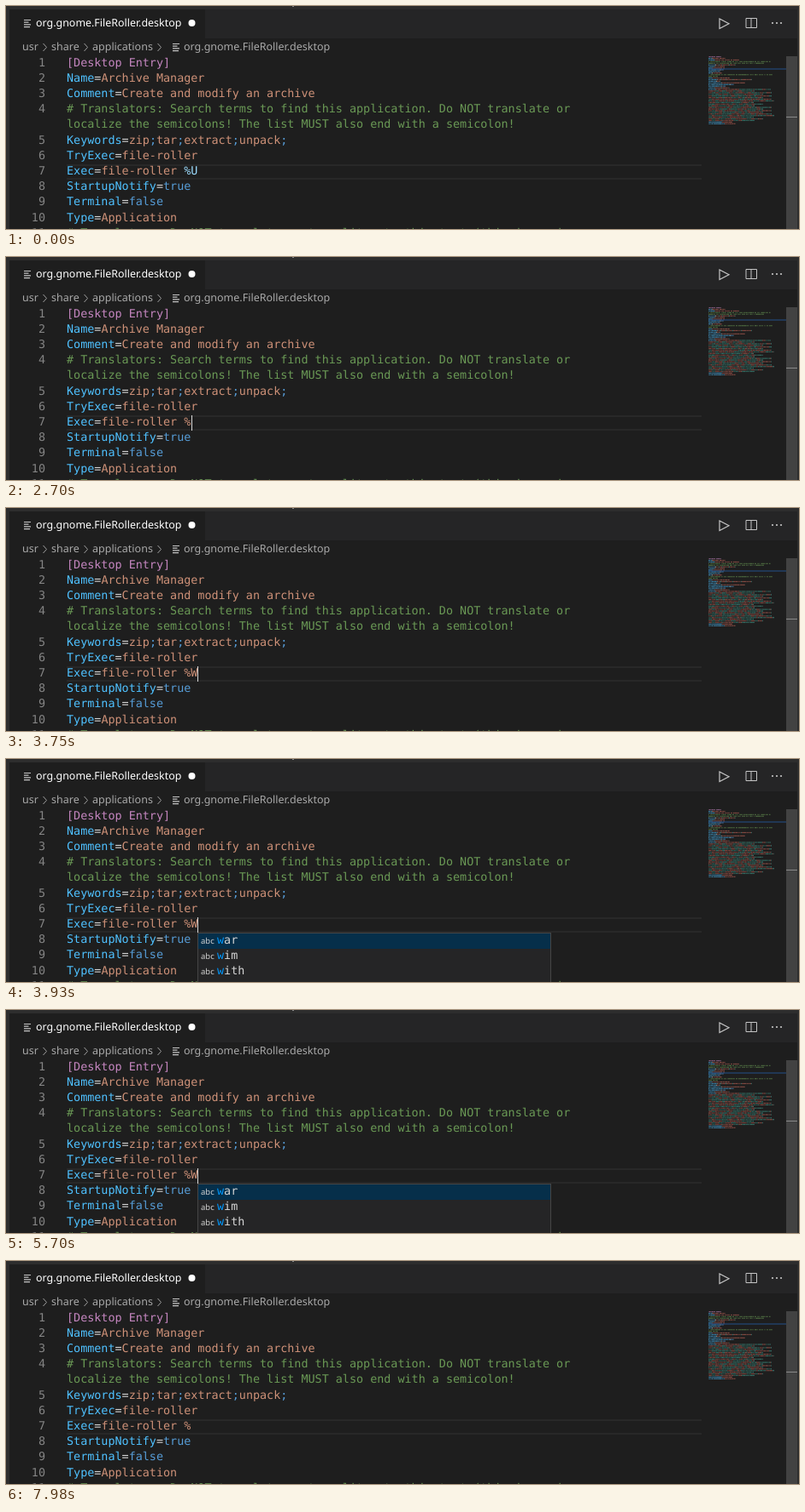
Recreate the animation shown at these times as an HTML page with a canvas. Size 928 by 262 pixels, loop 8000 ms.

```html
<!DOCTYPE html>
<html lang="en">
<head>
<meta charset="utf-8">
<title>Editing a desktop entry</title>
<style>
  html, body { margin: 0; width: 928px; height: 262px; overflow: hidden; background: #1e1e1e; }
  #stage { position: relative; width: 928px; height: 262px; overflow: hidden; text-rendering: geometricPrecision; }
  #stage > * { position: absolute; }
  .box { background: var(--c); }
  .tab, .crumb { font: 12.45px/18px "Noto Sans", sans-serif; white-space: pre; }
  .tab { top: 11px; color: #fff; }
  .crumb { top: 39px; font-size: 12.5px; color: #a9a9a9; }
  .row, .num, .item { font: 13.41px/18.2px "DejaVu Sans Mono", monospace; height: 18.2px; white-space: pre; }
  .row { left: 71px; color: #d4d4d4; }
  .num { left: 0; width: 46px; text-align: right; color: #858585; }
  .section { color: #c586c0; }
  .key { color: #4fc1ff; }
  .value { color: #ce9178; }
  .note { color: #6a9955; }
  .word, .semi { color: #569cd6; }

  #line { left: 71px; top: 186px; width: 743px; height: 18px; box-sizing: border-box; border: solid #282828; border-width: 2px 0; }
  #caret { top: 186px; left: 224px; width: 1px; height: 18px; background: #d8d8d8; }
  #popup { left: 224px; top: 204px; width: 412px; height: 70px; background: #252526; border: 1px solid #454545; }
  .item { position: relative; padding-left: 22px; color: #d4d4d4; }
  .item.on { background: #062f4a; }
  .item b { font-weight: normal; color: #0097fb; }
  .item i { position: absolute; left: 3px; font: 9.5px/18px "Noto Sans", sans-serif; color: #d0d0d0; }

  #caret, #popup, #pct, #u, #w { animation: 8s step-end infinite; }
  #caret { animation-name: blink, move; }
  #popup { animation-name: popup; }
  #pct { animation-name: recolor; }
  #u { color: #9cdcfe; animation-name: erase; }
  #w { position: absolute; animation-name: type; }

  @keyframes blink {
    0%, 11.25%, 22.5%, 38.625%, 52.125%, 63%, 77.25%, 88.5%, 99.75%, 100% { opacity: 0; }
    5.625%, 16.875%, 28.125%, 43.875%, 57%, 69%, 83.25%, 94.125% { opacity: 1; }
  }
  @keyframes move { 0% { left: 224px; } 33% { left: 217px; } 46.125% { left: 224px; } 71.625%, 100% { left: 217px; } }
  @keyframes popup { 0% { visibility: hidden; } 48.375% { visibility: visible; } 71.625%, 100% { visibility: hidden; } }
  @keyframes recolor { 0% { color: #9cdcfe; } 33%, 100% { color: #ce9178; } }
  @keyframes erase { 0% { visibility: visible; } 33%, 100% { visibility: hidden; } }
  @keyframes type { 0% { visibility: hidden; } 46.125% { visibility: visible; } 71.625%, 100% { visibility: hidden; } }
</style>
</head>
<body>
<div id="stage">
  <div class="box" style="--c:#252526;left:4px;top:4px;width:922px;height:34px"></div>
  <div class="box" style="--c:#1e1e1e;left:4px;top:4px;width:229px;height:34px"></div>
  <div class="box" style="--c:#2d2d2d;left:0;top:0;width:928px;height:4px"></div>
  <div class="box" style="--c:#2d2d2d;left:0;top:0;width:4px;height:262px"></div>
  <div class="box" style="--c:#2d2d2d;left:926px;top:0;width:2px;height:262px"></div>
  <div class="box" style="--c:#888;left:335px;top:0;width:2px;height:1px"></div>
  <div class="box" style="--c:#424242;left:913px;top:59px;width:13px;height:203px"></div>
  <div class="box" style="--c:#8a8a8a;left:913px;top:130px;width:13px;height:1px"></div>
  <div id="line"></div>

  <div class="tab" style="left:35px">org.gnome.FileRoller.desktop</div>
  <div class="crumb" style="left:19px">usr</div>
  <div class="crumb" style="left:53px">share</div>
  <div class="crumb" style="left:101px">applications</div>
  <div class="crumb" style="left:208px">org.gnome.FileRoller.desktop</div>

  <svg width="928" height="60" fill="none" stroke="#c5c5c5">
    <path id="list" d="M21 16.5h8m-8 2.700h5.500m-5.500 2.700h8m-8 2.700h7" stroke-width="1.200"/>
    <use href="#list" x="174" y="28"/>
    <path d="M43.500 44l4 4.500-4 4.500M91.500 44l4 4.500-4 4.500M177.500 44l4 4.500-4 4.500" stroke="#a0a0a0"/>
    <circle cx="217.500" cy="20" r="4" fill="#fff" stroke="none"/>
    <path d="M835 15v11.500l11-5.750z" stroke-width="1.200"/>
    <path d="M866 14.500h12.500v11h-12.500zM872 14.500v11"/>
    <path d="M897 20h.01m4.990 0h.01m4.990 0h.01" stroke-width="2.200" stroke-linecap="round"/>
  </svg>

  <canvas id="map" width="91" height="84" style="left:822px;top:58px"></canvas>
</div>

<script>
  const stage = document.getElementById('stage');
  const lines = [
    '[Desktop Entry]',
    'Name=Archive Manager',
    'Comment=Create and modify an archive',
    '# Translators: Search terms to find this application. Do NOT translate or\nlocalize the semicolons! The list MUST also end with a semicolon!',
    'Keywords=zip;tar;extract;unpack;',
    'TryExec=file-roller',
    'Exec=file-roller %U',
    'StartupNotify=true',
    'Terminal=false',
    'Type=Application',
    '# Translators: Do NOT translate or transliterate this text (this is an icon\nfile name)!',
    'Icon=org.gnome.FileRoller',
    'Categories=GTK;GNOME;Utility;Archiving;Compression;',
    'NotShowIn=KDE;',
    'X-GNOME-DocPath=file-roller/file-roller.xml',
    'X-GNOME-UsesNotifications=true',
    'DBusActivatable=true',
    'Actions=extract;compress;'
  ];

  // Split a line into [class, text] pieces.
  function tokens(line) {
    if (line[0] === '#') return [['note', line]];
    if (line[0] === '[') return [['section', line]];
    const at = line.indexOf('=');
    const value = line.slice(at + 1);
    const parts = /^(true|false)$/.test(value)
      ? [['word', value]]
      : value.split(/(;)/).filter(Boolean).map(s => [s === ';' ? 'semi' : 'value', s]);
    return [['key', line.slice(0, at)], ['', '='], ...parts];
  }

  function add(cls, top, html) {
    const el = document.createElement('div');
    el.className = cls;
    el.style.top = top + 'px';
    el.innerHTML = html;
    stage.append(el);
  }

  const arg = '<span id="pct">%</span><span id="w">W</span><span id="u">U</span>';
  let row = 0;
  lines.slice(0, 11).forEach((line, i) => {
    const top = 58.6 + 18.2 * row;
    const html = tokens(line).map(([c, s]) => `<span class="${c}">${s}</span>`).join('');
    add('num', top, i + 1);
    add('row', top, html.replace('%U', arg));
    row += line.split('\n').length;
  });

  stage.insertAdjacentHTML('beforeend',
    '<div id="popup">' + ['ar', 'im', 'ith'].map((s, i) =>
      `<div class="item${i ? '' : ' on'}"><i>abc</i><b>w</b>${s}</div>`).join('') +
    '</div><div id="caret"></div>');

  // Minimap: one small mark per character.
  const g = document.getElementById('map').getContext('2d');
  const tint = {
    section: '#c586c0', key: '#4fc1ff', value: '#c4675a', note: '#6a9955',
    word: '#569cd6', semi: '#4db6ac', teal: '#43a090', '': '#d4d4d4'
  };
  let seed = 7;
  const rand = () => (seed = seed * 16807 % 2147483647) / 2147483647;
  let x = 0, y = 1;
  function mark(cls, text) {
    g.fillStyle = tint[cls];
    for (const ch of text) {
      if (ch === '\n') { x = 0; y += 1.92; continue; }
      g.globalAlpha = 0.3 + 0.35 * rand();
      if (ch !== ' ') g.fillRect(x, y, 1, 1.2);
      x++;
    }
  }
  for (const line of lines) {
    for (const [cls, text] of tokens(line)) mark(cls, text);
    mark('', '\n');
  }
  mark('key', 'MimeType');
  mark('', '=');
  const kinds = '7z-compressed ace alz ar arj bzip bzip-compressed-tar cabinet cbr cbz cd-image compress cpio deb ear gtar gzip java-archive lha lzip lzma rar rpm stuffit tar tarz war xz zoo zip'.split(' ');
  for (let i = 0; ; i++) {
    const type = 'application/x-' + kinds[i % kinds.length];
    if (x + type.length > 79) mark('', '\n');
    if (y > 76) break;
    for (const part of type.match(/.{1,4}/g)) mark(rand() < 0.5 ? 'teal' : 'value', part);
    mark('semi', ';');
  }
  for (const [key, value] of [['X-Gettext-Domain', 'file-roller'], ['X-Window-FormFactor', 'Workstation;']]) {
    mark('key', key);
    mark('value', '=' + value + '\n');
  }
  g.globalAlpha = 1;
  g.fillStyle = '#22508a';
  g.fillRect(0, 15.5, 91, 1);
</script>
</body>
</html>
```
